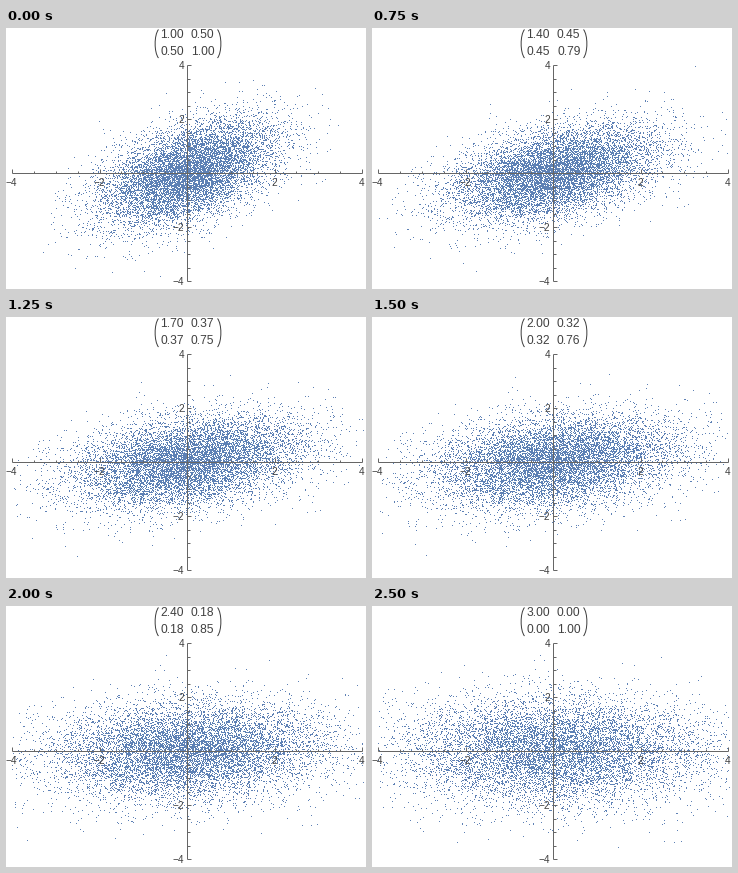
Animation of 360 by 261 pixels, one loop 2.75 s. Source, as a matplotlib script:

```python
import numpy as np
import matplotlib.pyplot as plt
from matplotlib.animation import FuncAnimation
from matplotlib.patches import PathPatch
from matplotlib.path import Path

W, H, DPI = 360, 261, 100
FRAMES, STEP_MS = 11, 250
COUNT = 10000
CX, CY = 181, 145            # pixel of the origin
UX, UY = 43.75, 27.0         # pixels per unit
BLUE, AXIS, INK = "#5e81b5", "#666666", "#404040"
FONT = "Liberation Sans"
PX = 72 / DPI                # one pixel in points

# Two ways of shaping the same noise: correlated and axis-aligned.
START = np.array([[0.75, -0.25], [0.75, 0.25]])
START = np.sign(START) * np.sqrt(np.abs(START))
END = np.diag([np.sqrt(3), 1])


def make_noise():
    z = np.random.default_rng(12).standard_normal((2, COUNT))
    z -= z.mean(axis=1, keepdims=True)
    z = np.linalg.solve(np.linalg.cholesky(np.cov(z)), z)
    return np.sqrt([[0.998], [1.007]]) * z


def entry(value):
    """Two significant digits, shown with two decimals."""
    value = round(value, 6) + 0.0
    return f"{float(f'{value:.2g}'):.2f}"


def label(x, y, text, size, ha="center"):
    return ax.text(x, y, text, fontsize=size * PX, family=FONT, color=INK,
                   ha=ha, va="center_baseline", zorder=4)


def line(xs, ys):
    ax.plot(xs, ys, color=AXIS, lw=PX, zorder=3, solid_capstyle="butt")


def draw_axes():
    line([6, 356], [CY, CY])
    line([CX, CX], [37, 253])
    for v in np.arange(-4, 4.5, 0.5):
        if v == 0:
            continue
        major = v % 2 == 0
        size = 4 if major else 2.5
        x, y = CX + v * UX, CY - v * UY
        line([x, x], [CY, CY - size])
        line([CX, CX + size], [y, y])
        if major:
            text = f"{v:.0f}".replace("-", "\u2212")
            label(x - 0.3, 154.5, text, 10)
            label(178, y, text, 10, ha="right")


def draw_paren(x, bulge):
    points = [(x, 1.5), (x + bulge, 7), (x + bulge, 24.5), (x, 30)]
    codes = [Path.MOVETO] + [Path.CURVE4] * 3
    ax.add_patch(PathPatch(Path(points, codes), fill=False,
                           ec=INK, lw=PX, zorder=4))


fig = plt.figure(figsize=(W / DPI, H / DPI), dpi=DPI, facecolor="white")
ax = fig.add_axes([0, 0, 1, 1])
ax.set_xlim(0, W)
ax.set_ylim(H, 0)
ax.axis("off")

noise = make_noise()
dots, = ax.plot([], [], ",", color=BLUE, zorder=2, antialiased=False)
draw_axes()
draw_paren(152.5, -4.5)
draw_paren(211.5, 4.5)
cells = [[label(x, y, "", 12) for x in (166, 196.7)] for y in (5.5, 22.5)]


def update(i):
    t = i / (FRAMES - 1)
    pts = ((1 - t) * START + t * END) @ noise
    x, y = CX + 0.5 + UX * pts[0], CY + 0.5 - UY * pts[1]
    keep = (x >= 6) & (x < 357) & (y >= 37) & (y < 257)
    dots.set_data(x[keep], y[keep])
    cov = np.cov(pts)
    for r in range(2):
        for c in range(2):
            cells[r][c].set_text(entry(cov[r, c]))
    return [dots, *cells[0], *cells[1]]


anim = FuncAnimation(fig, update, frames=FRAMES, interval=STEP_MS,
                     repeat=True, repeat_delay=0, blit=False)
plt.show()
```
